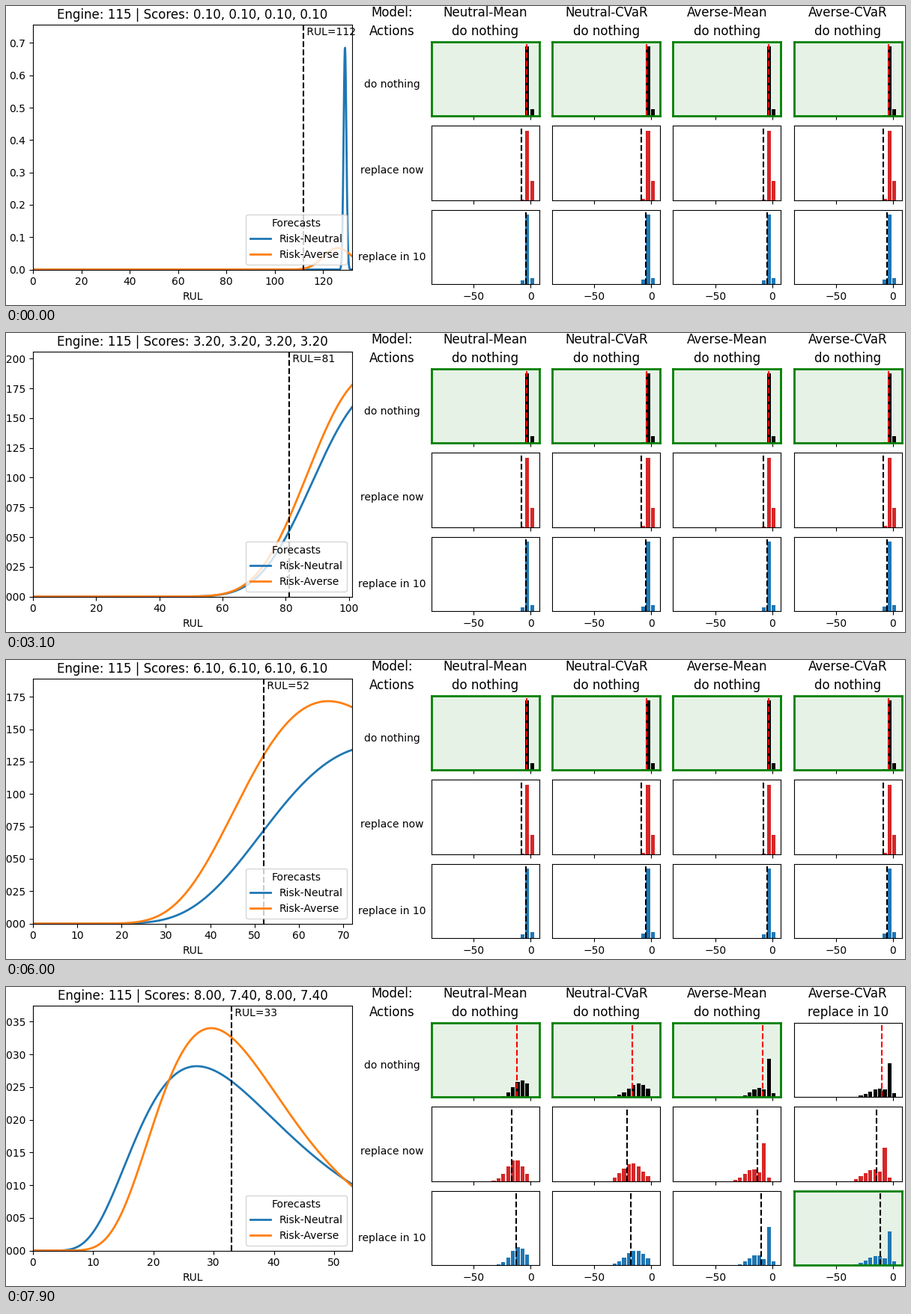
Animation of 1200x400 px, one loop 8000 ms. Source, as a matplotlib script:

```python
import numpy as np
import matplotlib.pyplot as plt
from matplotlib.animation import FuncAnimation

W, H, FRAMES = 1200, 400, 80
plt.rcParams["font.family"] = "DejaVu Sans"
fig = plt.figure(figsize=(W / 100, H / 100), dpi=100, facecolor="white")


def pixel_axes(left, top, width, height):
    return fig.add_axes([left / W, 1 - (top + height) / H, width / W, height / H])


# Key points of the log-normal forecasts: modes and sigmas over time.
STEPS = [0, 19, 31, 39, 52, 67, 79]
FORECASTS = {
    "Risk-Neutral": ([129.05, 116, 110.3, 115.5, 81.3, 74.5, 27.2],
                     [0.0045, 0.161, 0.2025, 0.148, 0.3315, 0.37, 0.4665]),
    "Risk-Averse": ([126, 115, 107.4, 110.4, 81.5, 53.6, 29.6],
                    [0.0475, 0.132, 0.195, 0.1454, 0.312, 0.3465, 0.37]),
}


def lognormal(x, mode, sigma):
    z = np.log(x / mode) / sigma - sigma
    return np.exp(-z * z / 2) / (x * sigma * np.sqrt(2 * np.pi))


# Forecast panel
main = pixel_axes(36, 25.3, 426, 327.3)
main.set_xlabel("RUL")
curves = [main.plot([], [], lw=2, label=name)[0] for name in FORECASTS]
rul_line = main.axvline(0, color="k", ls="--", lw=1.5)
rul_text = main.text(0, 0.957, "", transform=main.get_xaxis_transform())
main.legend(title="Forecasts", loc="lower right")

# Row captions
ACTIONS = ["do nothing", "replace now", "replace in 10"]
captions = pixel_axes(470.5, 47.8, 89, 324.6)
captions.axis("off")
captions.set_title("Model:\nActions", linespacing=1.5)
for row, action in enumerate(ACTIONS):
    captions.text(0.5, 0.825 - 0.357 * row, action, ha="center", va="center", clip_on=True)

# Utility histograms: bins run from the highest utility downwards.
MODELS = ["Neutral-Mean", "Neutral-CVaR", "Averse-Mean", "Averse-CVaR"]
BINS = np.arange(9)
LATE_VALUE = [-12.2, -17, -8.6, -10]
VALUE_SHIFT = [0, -4.3, -0.8]


def early_bars(row, cvar):
    bars = np.zeros(BINS.size)
    bars[:3] = [(9, 26, 8)[row], 93, (0, 1, 5)[row] + cvar]
    return bars


def late_bars(row, averse, cvar):
    """A bell of outcomes; averse models add a spike at the best ones."""
    center = (2.2, 3.5, 2.8)[row] + 0.8 * max(averse, cvar)
    peak = (23, 29, 25)[row] - 5 * cvar
    bars = peak * np.exp(-((BINS - center) / (1.7 + 0.4 * cvar)) ** 2 / 2)
    bars[0] = 0
    if averse:
        spike = 2 if row == 1 else 1
        bars *= 0.55 + 0.1 * cvar
        bars[spike - 1:spike + 1] = 5, 51 - 6 * cvar
    return bars


class Panel:
    def __init__(self, col, row):
        averse, cvar = divmod(col, 2)
        self.ax = pixel_axes(568 + 161.2 * col, 47.8 + 112.5 * row, 144, 99.6)
        self.ax.set(xlim=(-87, 7.7), ylim=(0, 99.6), xticks=[-50, 0], yticks=[])
        self.ax.tick_params(labelbottom=row == 2)
        self.early, self.late = early_bars(row, cvar), late_bars(row, averse, cvar)
        self.values = np.array([-3.6 + 0.3 * averse - 0.8 * cvar, LATE_VALUE[col]]) + VALUE_SHIFT[row]
        self.bars = self.ax.bar(1.3 - 4.22 * BINS, self.early, 3.38, color=("k", "C3", "C0")[row])
        self.line = self.ax.axvline(0, color="k" if row else "r", ls="--", lw=1.5)

    def update(self, mix, chosen):
        for bar, height in zip(self.bars, self.early + mix * (self.late - self.early)):
            bar.set_height(height)
        self.line.set_xdata([self.values @ (1 - mix, mix)] * 2)
        self.ax.set_facecolor(("green", 0.1) if chosen else "white")
        for spine in self.ax.spines.values():
            spine.set(color="green" if chosen else "black", linewidth=2 if chosen else 0.8)


panels = [[Panel(col, row) for row in range(3)] for col in range(4)]


def update(step):
    rul = 112 - step
    x = np.linspace(0.01, rul + 20, 1000)
    peak = 0
    for curve, (modes, sigmas) in zip(curves, FORECASTS.values()):
        mode, sigma = np.interp(step, STEPS, modes), np.interp(step, STEPS, sigmas)
        curve.set_data(x, lognormal(x, mode, sigma))
        peak = max(peak, lognormal(mode, mode, sigma))
    main.set(xlim=(0, rul + 20), ylim=(0, 1.1 * peak))
    rul_line.set_xdata([rul, rul])
    rul_text.set_x(rul)
    rul_text.set_text(f" RUL={rul}")

    score = (step + 1) / 10
    scores = [min(score, 7.4) if col % 2 else score for col in range(4)]
    main.set_title("Engine: 115 | Scores: " + ", ".join(f"{s:.2f}" for s in scores))

    mix = np.clip((step - 67) / 12, 0, 1) ** 1.3
    for col, model in enumerate(MODELS):
        choice = 2 if col == 3 and step >= 73 else 0
        panels[col][0].ax.set_title(f"{model}\n{ACTIONS[choice]}", linespacing=1.5)
        for row, panel in enumerate(panels[col]):
            panel.update(mix, row == choice)
    return []


anim = FuncAnimation(fig, update, frames=FRAMES, interval=100, repeat=True, repeat_delay=0,
                     init_func=lambda: update(0))
plt.show()
```
